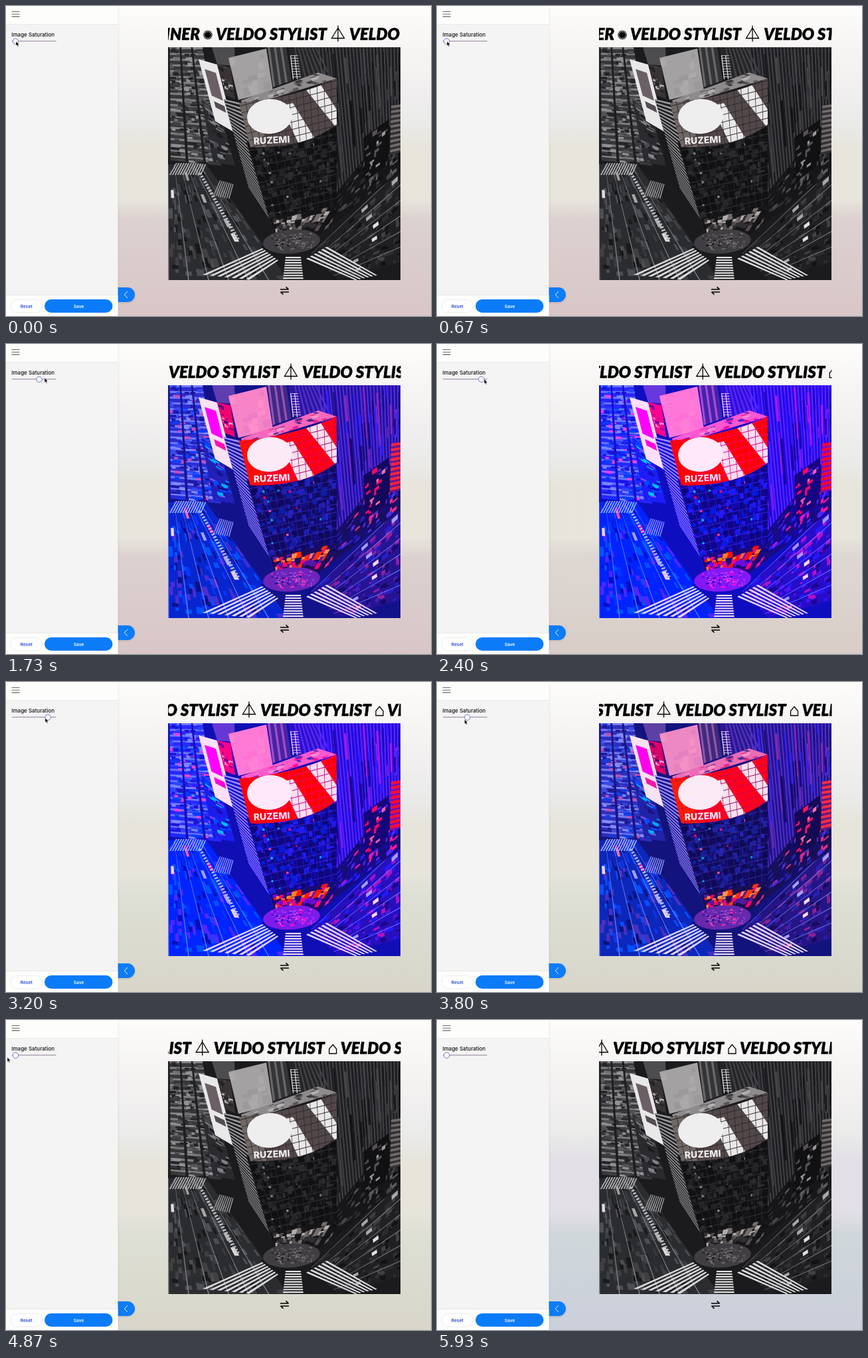
Recreate the animation shown at these times as an HTML page with a canvas. Size 640x466 px, loop 5.99 s.

```html
<!DOCTYPE html>
<html lang="en">
<head>
<meta charset="utf-8">
<title>Image saturation editor</title>
<style>
html, body { margin: 0; width: 100%; height: 100%; overflow: hidden; }
#stage { position: relative; width: 640px; height: 466px; overflow: hidden; }
.sky {
  position: absolute; inset: 0;
  background: linear-gradient(#fdfcfa, #f3f0f0 110px, #ebebea 170px,
    var(--mid) 212px, var(--mid) 290px, var(--low) 320px, var(--end));
}
#rose { --mid: #e8e5dd; --low: #dcd1d0; --end: #d9c6c7; }
#sand { --mid: #e6e4db; --low: #dedfd5; --end: #d8d6c9; }
#mist { --mid: #e2dfe6; --low: #d0d7da; --end: #cbcfdb; }
#photo { position: absolute; left: 244px; top: 62px; }
#ui { position: absolute; left: 0; top: 0; }
.band { font: italic 900 24px Lato, sans-serif; stroke: #000; stroke-width: .5; }
.label { font: 500 8px Inter, sans-serif; fill: #111; }
.btn { font: 600 6.6px Inter, sans-serif; text-anchor: middle; }
.line { fill: none; stroke: #000; stroke-width: 1.3; }
</style>
</head>
<body>
<div id="stage">
  <div class="sky" id="rose"></div>
  <div class="sky" id="sand"></div>
  <div class="sky" id="mist"></div>
  <canvas id="photo" width="350" height="350"></canvas>
  <svg id="ui" width="640" height="466">
    <defs>
      <clipPath id="window"><rect x="244" y="26" width="350.5" height="32"/></clipPath>
      <filter id="soft" x="-20%" y="-20%" width="140%" height="150%">
        <feDropShadow dx="0" dy="1" stdDeviation="1.5" flood-opacity=".15"/>
      </filter>
    </defs>

    <g clip-path="url(#window)">
      <g id="marquee" class="band">
        <text x="292" y="51" text-anchor="end">SPINNER</text>
        <path id="burst" style="stroke-width:1.3"/>
        <text x="316" y="51">VELDO STYLIST</text>
        <path class="line" d="M500 29.5V53.5M500 33L490.5 48.5H509.5Z"/>
        <text x="517" y="51">VELDO STYLIST</text>
        <path class="line" d="M691 50.5V43.5L696.5 37L702 43.5V50.5Z"/>
        <text x="708" y="51">VELDO STYLIST</text>
      </g>
    </g>

    <path d="M413 426H425.5M421.5 422.3L425.5 426M426 430H413.5M417.5 433.7L413.5 430"
      fill="none" stroke="#000" stroke-width="1.7"/>

    <path d="M166 423H183A11 11 0 0 1 183 445H166Z" fill="#0b7bf7" filter="url(#soft)"/>
    <path d="M183 429L178.3 434L183 439" fill="none" stroke="#fff" stroke-width=".9"/>

    <rect x="-10" width="178.5" height="466" fill="#f4f4f4" filter="url(#soft)"/>
    <rect width="168.5" height="27" fill="#fdfdfb"/>
    <rect y="435" width="168.5" height="31" fill="#fdfdfb"/>
    <path d="M0 27.5H168.5M0 434.5H168.5" stroke="#e8e8e8"/>
    <path d="M8.5 8.5H20.5M8.5 12.2H20.5M8.5 15.9H20.5" stroke="#666" stroke-width="1.1"/>
    <text class="label" x="8.3" y="45.5">Image Saturation</text>

    <rect x="7" y="441.5" width="47.5" height="19.5" rx="9.7" fill="#fff" stroke="#e8e8ea" stroke-width=".8"/>
    <text class="btn" x="30.7" y="453.8" fill="#2348d0">Reset</text>
    <rect x="58" y="441" width="102.5" height="20" rx="10" fill="#0b7bf7"/>
    <text class="btn" x="109.5" y="453.8" fill="#fff">Save</text>

    <path d="M9.5 52.8H75" stroke="#b3a4b8" stroke-width="1.6" stroke-linecap="round"/>
    <circle id="knob" cy="53.2" r="4.2" fill="#fff" stroke="#6a6fc4"/>
    <path id="cursor" d="M0 0V7L1.6 5.6L2.8 8.2L4 7.6L2.9 5.1H5Z" stroke="#fff" stroke-width=".5"/>
  </svg>
</div>

<script>
const LOOP = 5990;
const $ = id => document.getElementById(id);
const ctx = $('photo').getContext('2d');
ctx.translate(-244, -62);

let seed = 11;
const rand = () => (seed = seed * 16807 % 2147483647) / 2147483647;
const pick = list => list[Math.floor(rand() * list.length)];
const mix = (a, b, k) => a + (b - a) * k;
const clamp = k => Math.min(1, Math.max(0, k));

// A quad runs clockwise from its top left corner
const quad = s => s.split(' ').map(p => p.split(',').map(Number));
const at = ([a, b, c, d], u, v) =>
  [0, 1].map(i => mix(mix(a[i], b[i], u), mix(d[i], c[i], u), v));

function cell(q, u, v, w, h, colour) {
  ctx.fillStyle = colour;
  ctx.beginPath();
  ctx.lineTo(...at(q, u, v));
  ctx.lineTo(...at(q, u + w, v));
  ctx.lineTo(...at(q, u + w, v + h));
  ctx.lineTo(...at(q, u, v + h));
  ctx.fill();
}

function face(s, colour) {
  const q = quad(s);
  if (colour) cell(q, 0, 0, 1, 1, colour);
  return q;
}
function rows(q, n, duty, colour) {
  for (let i = 0; i < n; i++) cell(q, 0, i / n, 1, duty / n, colour);
}
function cols(q, n, duty, colour) {
  for (let i = 0; i < n; i++) cell(q, i / n, 0, duty / n, 1, colour);
}
function specks(q, n, w, h, colours) {
  for (let i = 0; i < n; i++) {
    const dw = w * mix(.3, 1, rand()), dh = h * mix(.3, 1, rand());
    cell(q, rand() * (1 - dw), rand() * (1 - dh), dw, dh, pick(colours));
  }
}
function oval(x, y, rx, ry, colour) {
  ctx.fillStyle = colour;
  ctx.beginPath();
  ctx.ellipse(x, y, rx, ry, -.08, 0, 7);
  ctx.fill();
}

const PAINT = ['#e8dce4', '#c43a62', '#a7a5c6', '#d9909e'];
const ROAD = ['#2b3a7c', '#14173f', '#33509a', '#443a70'];
const NIGHT = ['#17143c', '#29285c', '#0f0d28'];
const CITY = ['#22204e', '#4a5088', '#8c8fb6', '#8d6488', '#2d3f80'];

// Road with lanes along its length and a few cars
function road(s, base, lanes, colours) {
  const q = face(s, base);
  specks(q, 150, .06, .09, colours);
  cols(q, lanes, .05, '#7d83b0');
  for (let i = 0; i < 7; i++)
    cell(q, (Math.floor(rand() * lanes) + .3) / lanes, rand() * .75, .05, .07, pick(PAINT));
}

function drawStreets() {
  face('244,62 594,62 594,412 244,412', '#181840');
  road('244,238 300,236 425,412 244,412', '#202a62', 6, ROAD);
  road('594,245 594,385 500,412 460,372', '#221c46', 6, ['#3a2a5e', '#15102f', '#5c3660', '#2a2860']);
  rows(face('290,252 294,250 353,352 347,354'), 24, .5, '#b9bbd6');
  cols(face('256,236 304,236 296,254 246,254'), 13, .5, '#a9add0');
  cols(face('322,262 344,268 338,290 312,285'), 8, .5, '#9094b8');
  rows(face('386,364 296,404 372,412 412,384'), 7, .5, '#ded9e8');
  rows(face('421,377 444,377 448,412 417,412'), 9, .55, '#e6e0ec');
  rows(face('452,380 526,412 562,404 486,360'), 6, .5, '#ded9e8');
}

function drawLeftBlocks() {
  const tower = face('244,62 296,62 324,240 244,232', '#34346a');
  rows(tower, 20, .35, '#7c7fac');
  specks(tower, 240, .2, .03, CITY);
  cols(tower, 3, .15, '#1c1b44');

  const side = face('294,140 324,165 345,240 312,235', '#28285a');
  specks(side, 50, .35, .06, ['#3f91bb', '#6a5c94', '#334a9a', '#1a1840']);

  face('310,62 344,62 345,90 318,88', '#53486e');
  const board = face('290,80 318,88 344,190 315,173', '#eee6ec');
  cell(board, .2, .14, .6, .42, '#d83a96');
  cell(board, .25, .64, .55, .1, '#8c3a70');

  const banner = face('318,88 338,92 345,140 330,134', '#741f48');
  specks(banner, 20, .4, .12, ['#d8b8c5', '#361a40', '#a82e58']);
}

function drawRightBlocks() {
  face('425,62 472,62 500,112 432,108', '#27204c');
  const tower = face('470,62 594,62 594,165 494,285', '#1f194a');
  cols(tower, 24, .4, '#483c72');
  cols(face('434,62 470,62 496,110 442,108'), 7, .4, '#483c72');
  specks(tower, 50, .03, .4, ['#141030', '#5c3a6a', '#352e78']);

  const low = face('500,278 594,162 594,250 470,345', '#17142f');
  specks(low, 130, .07, .1, [...NIGHT, '#8d4a6c', '#453a78']);
  const dark = face('538,198 577,170 576,238 541,264', '#120e2a');
  specks(dark, 20, .2, .12, ['#a43958', '#c48a9c', '#40366a']);
  rows(face('580,150 594,148 594,220 578,224', '#43284e'), 10, .5, '#c2555c');
}

function drawRoof() {
  const wall = face('335,78 392,64 402,128 350,141', '#be98ae');
  specks(wall, 12, .3, .2, ['#c6a0b4', '#b590a8']);
  cols(face('394,62 422,62 430,112 402,122', '#38304f'), 3, .35, '#76607f');
  const slab = face('354,142 470,100 498,109 358,152', '#b0809c');
  specks(slab, 30, .08, .3, ['#d0a8ba', '#40365a', '#8a4668']);
  const mast = face('428,74 440,74 444,110 432,110');
  rows(mast, 9, .2, '#e2d5e0');
  cols(mast, 2, .2, '#ece3ea');
}

function drawTower() {
  rows(face('328,140 354,146 406,336 366,275', '#211f4c'), 26, .42, '#a19cc4');
  const glass = face('362,205 498,180 498,312 402,338', '#110f2c');
  specks(glass, 260, .07, .07, [...NIGHT, '#1c2250', '#2c2a62']);
  rows(glass, 11, .1, '#2c2852');
  cols(glass, 11, .08, '#2a2650');
  specks(glass, 16, .03, .03, ['#c03b57', '#3a879a', '#c9778a']);

  const shops = face('400,318 498,300 470,345 404,342', '#17132c');
  specks(shops, 60, .1, .25, ['#c45a48', '#d9a38d', '#a82f5a', '#3d2758']);
  oval(430, 354, 43, 18, '#4e3668');
  specks(quad('398,344 465,340 465,366 402,368'), 110, .07, .1, ['#211a44', '#917198', '#a85080', '#69508c']);
}

function drawSign() {
  ctx.save();
  ctx.beginPath();
  ctx.moveTo(351, 146);
  ctx.quadraticCurveTo(440, 137, 498, 109);
  ctx.lineTo(498, 178);
  ctx.quadraticCurveTo(450, 215, 368, 212);
  ctx.clip();
  const panel = face('348,140 500,100 500,190 366,224', '#d02438');
  cell(panel, 0, 0, .2, 1, '#da4c38');
  face('451,125 473,117 504,165 500,186', '#f1e5ea');
  face('414,150 432,146 468,204 444,214', '#f1e5ea');
  cols(panel, 14, .07, '#4a1c3c');
  rows(panel, 8, .08, '#4a1c3c');
  ctx.restore();

  oval(397, 166, 34, 26, '#f3edf1');
  ctx.save();
  ctx.translate(373, 208);
  ctx.rotate(-.05);
  ctx.font = '800 14px Inter, sans-serif';
  ctx.fillStyle = '#f3edf3';
  ctx.fillText('RUZEMI', 0, 0);
  ctx.restore();
}

[drawStreets, drawLeftBlocks, drawRightBlocks, drawRoof, drawTower, drawSign].forEach(f => f());

let rays = '';
for (let i = 0; i < 8; i++) {
  const a = i * Math.PI / 8, x = 7 * Math.cos(a), y = 7 * Math.sin(a);
  rays += `M${304 - x} ${43.5 - y}L${304 + x} ${43.5 + y}`;
}
$('burst').setAttribute('d', rays);

// Key points: time, then values
const SCROLL = [[0, 0], [1130, 42], [1730, 71], [3200, 134], [4330, 180], [5930, 252], [LOOP, 255]];
// time, knob x, cursor x, cursor y
const DRAG = [
  [850, 14.5, 15, 53], [1130, 24, 33, 52], [1730, 50, 58, 51], [2450, 68, 72, 53],
  [3200, 63, 59, 54], [4330, 30.5, 26, 58], [4870, 14.5, 2, 56], [5050, 14.5, -9, 56]
];

function sample(keys, t) {
  const i = Math.max(1, keys.findIndex(key => key[0] >= t));
  if (t > keys.at(-1)[0]) return keys.at(-1).slice(1);
  const a = keys[i - 1], b = keys[i];
  const k = clamp((t - a[0]) / (b[0] - a[0]));
  return a.slice(1).map((v, n) => mix(v, b[n + 1], k));
}

function draw(t) {
  const [knob, x, y] = sample(DRAG, t);
  const [scroll] = sample(SCROLL, t);
  $('knob').setAttribute('cx', knob);
  $('cursor').setAttribute('transform', `translate(${x} ${y})`);
  $('marquee').setAttribute('transform', `translate(${-scroll} 0)`);
  $('photo').style.filter = `saturate(${Math.max(.07, (knob - 14.5) * .085)})`;
  $('sand').style.opacity = clamp((t - 1730) / 1470);
  $('mist').style.opacity = clamp((t - 4870) / 1060);
}

const start = performance.now();
function tick() {
  draw((performance.now() - start) % LOOP);
  requestAnimationFrame(tick);
}
tick();
</script>
</body>
</html>
```
